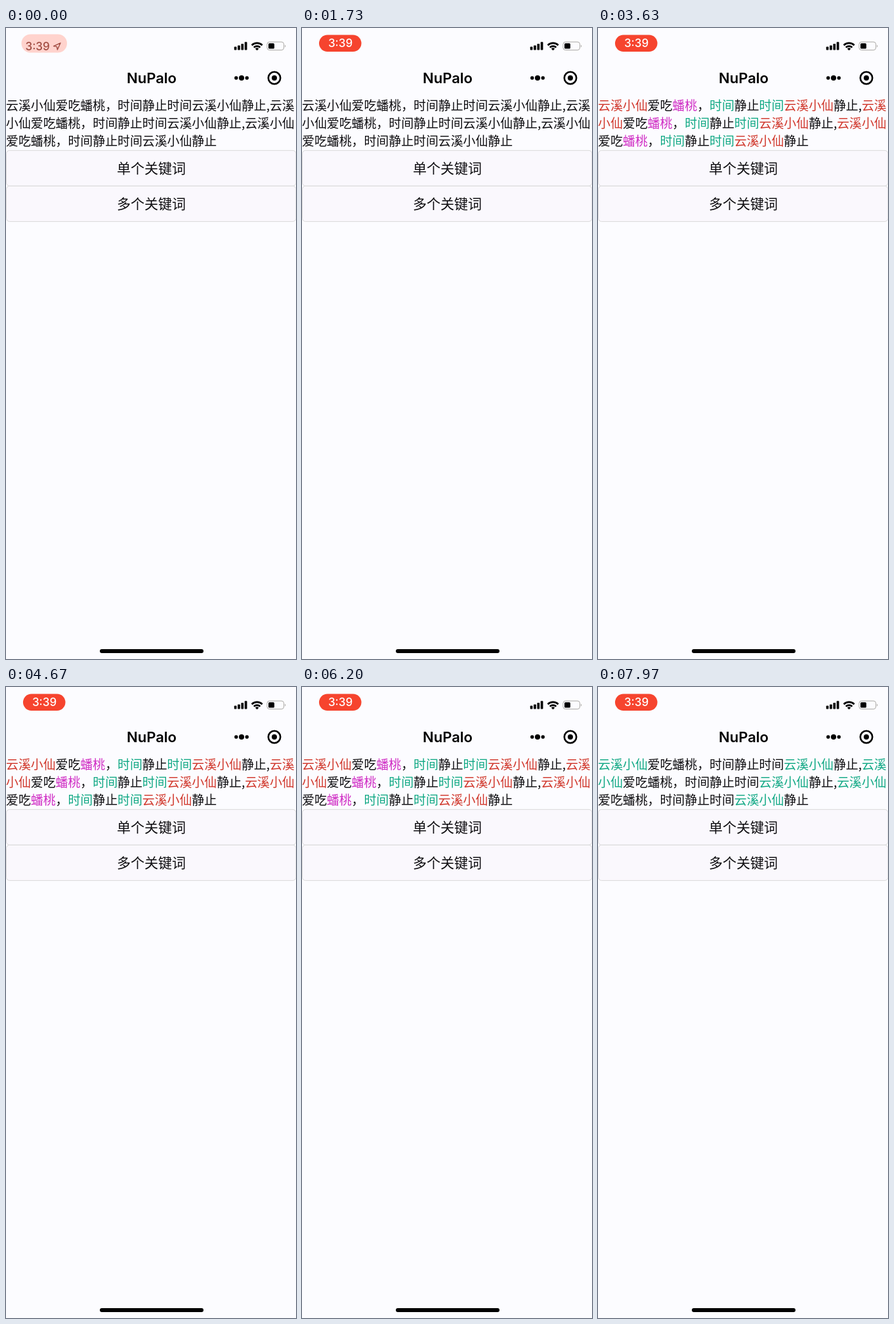
Write an HTML page that moves like this. It is 442 px wide and 960 px high and loops after 8 s.

```html
<!DOCTYPE html>
<html lang="zh-CN">
<head>
<meta charset="utf-8">
<title>Keyword highlight</title>
<style>
  html, body { margin: 0; width: 100%; height: 100%; overflow: hidden; background: #fcfcff; }
  svg { display: block; width: 100%; height: 100%; }
  .latin { font-family: Inter, "Liberation Sans", sans-serif; }
  .cjk { font-family: "Noto Sans CJK SC", "Noto Sans CJK", sans-serif; }
  text { white-space: pre; }
</style>
</head>
<body>
<svg viewBox="0 0 442 960" xmlns="http://www.w3.org/2000/svg">
  <rect width="442" height="960" fill="#fcfcff"/>

  <rect id="pill"/>
  <g id="oldTime" fill="#a04a40">
    <text class="latin" x="29.5" y="33.6" font-size="17" font-weight="500">3:39</text>
    <path d="M72.5 27.6 83 22.8 78.4 33 77.4 28.4Z" fill="none" stroke="#a04a40" stroke-width="1.4" stroke-linejoin="round"/>
  </g>
  <text id="newTime" class="latin" x="58.5" y="29.2" font-size="17" font-weight="500" text-anchor="middle" fill="#fff">3:39</text>

  <g id="signal"></g>
  <g fill="none" stroke="#000" stroke-width="2.7">
    <path d="M374.6 26.2a11.4 11.4 0 0 1 16 0"/>
    <path d="M377.8 29.6a6.8 6.8 0 0 1 9.6 0"/>
  </g>
  <path d="M379.9 31.6a3.8 3.8 0 0 1 5.4 0L382.6 34.2Z"/>
  <rect x="398" y="21.2" width="25.5" height="12.4" rx="3.6" fill="none" stroke="#aaa8a4"/>
  <rect x="400" y="23.2" width="9" height="8.4" rx="1.6"/>
  <path d="M425 25.4a2.4 2.4 0 0 1 0 4Z" fill="#aaa8a4"/>

  <text class="latin" x="222" y="84" font-size="22" font-weight="600" text-anchor="middle">NuPalo</text>
  <circle cx="350.8" cy="76" r="2.7"/>
  <circle cx="359" cy="76" r="4"/>
  <circle cx="367.2" cy="76" r="2.7"/>
  <circle cx="409" cy="76" r="9.2" fill="none" stroke="#000" stroke-width="2.6"/>
  <circle cx="409" cy="76" r="4"/>

  <g id="lines" class="cjk" font-size="18.9"></g>
  <g id="buttons" class="cjk" font-size="21" text-anchor="middle"></g>
  <rect x="143" y="945" width="158" height="6" rx="3"/>
</svg>
<script>
const LOOP = 8000, FIRST_TAP = 2600, TAP_GAP = 650, HOVER = 70, FADE = 300;
const INK = '#0e0d10', RED = '#d0362a', GREEN = '#10a884', PINK = '#cf2cc4';
const HERO = '云溪小仙';
const TEXT = Array(3).fill(HERO + '爱吃蟠桃，时间静止时间' + HERO + '静止').join(',');
const PER_LINE = 24;
const MODES = {
  plain: {},
  single: { [HERO]: GREEN },
  multi: { [HERO]: RED, '蟠桃': PINK, '时间': GREEN }
};

const $ = id => document.getElementById(id);
function add(parent, tag, attrs, content = '') {
  const el = document.createElementNS('http://www.w3.org/2000/svg', tag);
  set(el, attrs);
  el.textContent = content;
  return parent.appendChild(el);
}
function set(el, attrs) {
  for (const k in attrs) el.setAttribute(k, attrs[k]);
}
const mix = (a, b, p) => a + (b - a) * p;

// One colour per character, so keywords may wrap across lines
function colours(words) {
  const out = Array(TEXT.length).fill(INK);
  for (const word in words)
    for (let i = TEXT.indexOf(word); i >= 0; i = TEXT.indexOf(word, i + word.length))
      out.fill(words[word], i, i + word.length);
  return out;
}

function buildText(words) {
  const group = add($('lines'), 'g', {});
  const ink = colours(words);
  for (let start = 0, y = 124.9; start < TEXT.length; start += PER_LINE, y += 27.1) {
    const line = add(group, 'text', { x: 0, y });
    const end = Math.min(start + PER_LINE, TEXT.length);
    for (let i = start, j; i < end; i = j) {
      for (j = i + 1; j < end && ink[j] === ink[i];) j++;
      add(line, 'tspan', { fill: ink[i] }, TEXT.slice(i, j));
    }
  }
  return group;
}

function buildButton(label, y) {
  return {
    box: add($('buttons'), 'rect', { x: 0.5, y, width: 441.5, height: 54, rx: 5 }),
    label: add($('buttons'), 'text', { x: 221.5, y: y + 34.3 }, label)
  };
}

[5, 7, 9.5, 12.3].forEach((h, i) =>
  add($('signal'), 'rect', { x: 347.8 + i * 5.3, y: 33.5 - h, width: 3.7, height: h, rx: 0.8 }));
const texts = Object.fromEntries(Object.entries(MODES).map(([k, words]) => [k, buildText(words)]));
const buttons = [buildButton('单个关键词', 186.3), buildButton('多个关键词', 240.4)];

function render(t) {
  const p = Math.min(t / FADE, 1), e = p * (2 - p);
  set($('pill'), {
    x: mix(23.5, 26, e), y: mix(9.5, 10.5, e),
    width: mix(69.5, 64.5, e), height: mix(28, 25.5, e), rx: mix(14, 12.75, e),
    fill: `rgb(${mix(255, 246, e)},${mix(212, 68, e)},${mix(206, 46, e)})`
  });
  $('oldTime').style.opacity = 1 - e;
  $('newTime').style.opacity = e;

  // Taps alternate between the two buttons; the text switches on release
  const taps = Math.floor((t - FIRST_TAP) / TAP_GAP);
  const mode = taps < 0 ? 'plain' : taps % 2 ? 'multi' : 'single';
  for (const k in texts) texts[k].style.display = k === mode ? '' : 'none';

  const near = Math.round((t - FIRST_TAP) / TAP_GAP);
  const held = near >= 0 && Math.abs(t - FIRST_TAP - near * TAP_GAP) < HOVER;
  buttons.forEach((b, i) => {
    const down = held && near % 2 === i;
    set(b.box, { fill: down ? '#dcdbde' : '#faf8fd', stroke: down ? '#c4c4c0' : '#d9d9d9' });
    set(b.label, { fill: down ? '#716b68' : INK });
  });
}

const begin = performance.now();
function tick() {
  render((performance.now() - begin) % LOOP);
  requestAnimationFrame(tick);
}
render(0);
requestAnimationFrame(tick);
</script>
</body>
</html>
```
